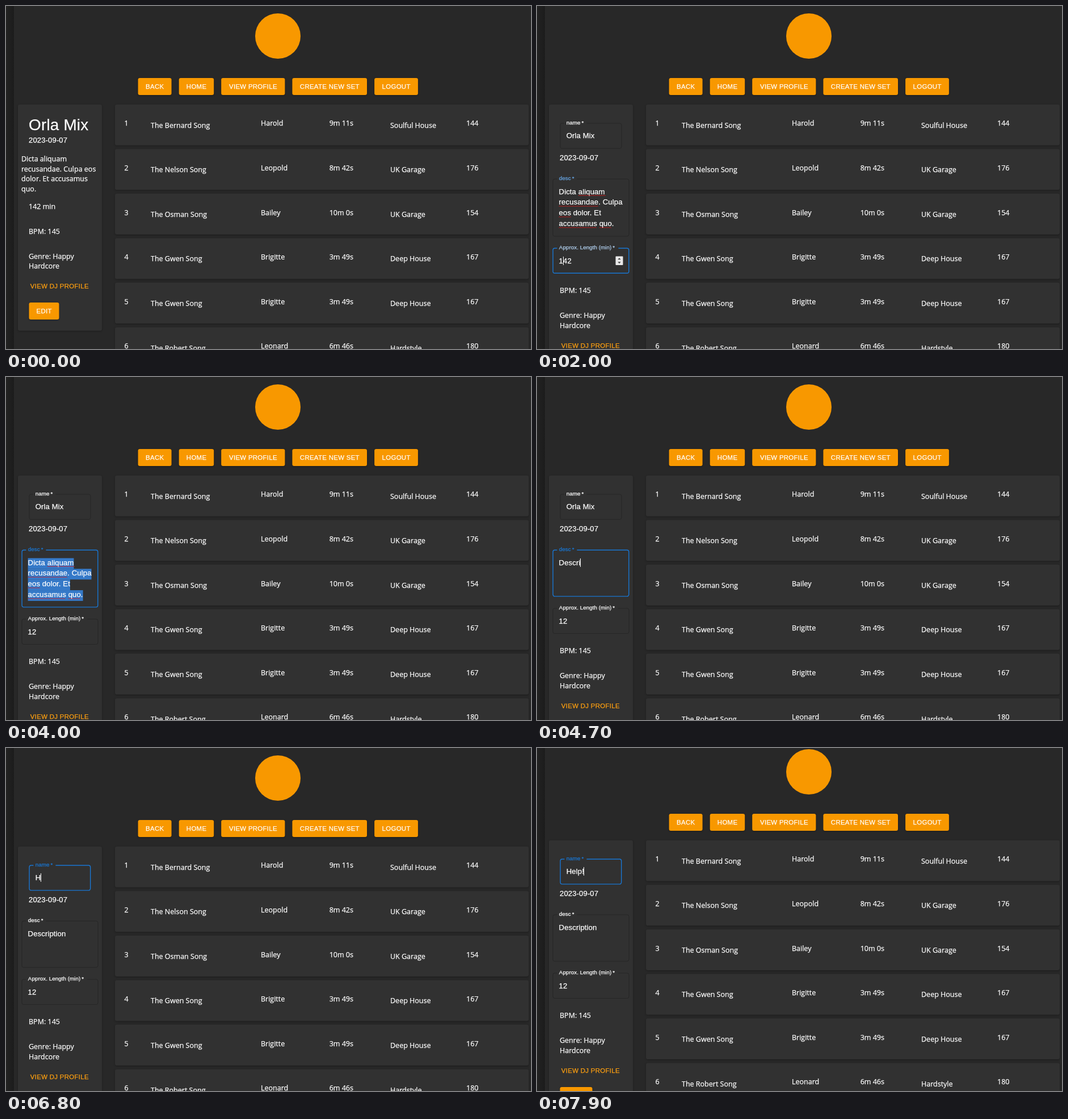
An HTML page that plays this animation: 925 by 605 pixels, repeating every 8000 ms.

```html
<!DOCTYPE html>
<html lang="en">
<head>
<meta charset="utf-8">
<title>Edit a set</title>
<style>
html, body { margin: 0; width: 100%; height: 100%; overflow: hidden; background: #282828; }
svg { display: block; }
text { color: #fff; fill: currentColor; stroke: currentColor; stroke-width: .25px; white-space: pre; }
.body { font: 12.5px "Open Sans", "Noto Sans", sans-serif; }
.input { font: 13.1px "Liberation Sans", Arial, sans-serif; letter-spacing: .12px; }
.label { font: 9.8px "Liberation Sans", Arial, sans-serif; letter-spacing: .05px; }
.button { font: 11.4px "Liberation Sans", Arial, sans-serif; letter-spacing: .33px; }
.title { font: 27.9px "Liberation Sans", Arial, sans-serif; letter-spacing: .2px; }
.card { fill: #313131; filter: drop-shadow(0 1px 1.5px rgba(0,0,0,.3)); }
.press { filter: drop-shadow(0 1px 1.5px rgba(0,0,0,.3)); }
</style>
</head>
<body>
<svg width="925" height="605">
  <defs>
    <linearGradient id="edge"><stop stop-color="#222"/><stop offset="1" stop-color="#1c1c1c"/></linearGradient>
  </defs>
  <rect width="925" height="605" fill="#282828"/>
  <rect width="14" height="605" fill="url(#edge)"/>
  <g id="page"><g id="fixed"></g><g id="side"></g></g>
</svg>
<script>
const LOOP = 8000, ORANGE = "#f89800", BLUE = "#1976d2";
const SET = "Orla Mix";
const DESC = ["Dicta aliquam", "recusandae. Culpa", "eos dolor. Et", "accusamus quo."];
const $ = id => document.getElementById(id);
const pen = document.createElement("canvas").getContext("2d");
pen.font = '13.1px "Liberation Sans", Arial, sans-serif';
const width = s => pen.measureText(s).width + s.length * .12;

// Baselines sit on whole pixels
const text = (cls, x, y, s, extra = "") => `<text class="${cls}" x="${x}" y="${Math.floor(y)}" ${extra}>${s}</text>`;
const rect = (x, y, w, h, fill, extra = "") =>
  `<rect x="${x}" y="${y}" width="${w}" height="${h}" fill="${fill}" ${extra}/>`;
const button = (x, y, w, s, fill = ORANGE) =>
  rect(x, y, w, 30, fill, 'rx="3.3" class="press"') +
  text("button", x + w / 2 + .16, y + 19, s, 'text-anchor="middle"');
const card = (x, y, w, h) => `<rect class="card" x="${x}" y="${y}" width="${w}" height="${h}" rx="3.3"/>`;
const caret = (x, y, s) => rect(Math.floor(x + width(s)), y, 1, 15, "#fff");

function squiggle(x, y, before, word) {
  const a = x + width(before), n = Math.round(width(word) / 3);
  return `<path d="M${a} ${y}${"l1.5 -1.5l1.5 1.5".repeat(n)}" fill="none" stroke="#e01818" stroke-width=".9"/>`;
}

// Outlined box whose top border leaves a gap for the label
function field(x, y, w, h, label, gap, blue, focus, hover) {
  const r = 3.3, k = focus ? 1.4 : 1, i = k / 2;
  const l = x + i, t = y + i, R = x + w - i, b = y + h - i;
  const stroke = focus ? BLUE : hover ? "#080808" : "#262626";
  const d = `M${x + 8 + gap} ${t}H${R - r}a${r} ${r} 0 0 1 ${r} ${r}V${b - r}a${r} ${r} 0 0 1 ${-r} ${r}` +
    `H${l + r}a${r} ${r} 0 0 1 ${-r} ${-r}V${t + r}a${r} ${r} 0 0 1 ${r} ${-r}H${x + 8}`;
  const c = [25, 118, 210].map(v => Math.round(255 + (v - 255) * blue));
  return `<path d="${d}" fill="none" stroke="${stroke}" stroke-width="${k}"/>` +
    text("label", x + 11.4, y + 3.1, label + "\u2009*", `style="color:rgb(${c})"`);
}

function fixedParts() {
  const nav = [[232.6, 59, "BACK"], [304.7, 61.5, "HOME"], [379.2, 112.2, "VIEW PROFILE"],
    [504.4, 131.6, "CREATE NEW SET"], [649.1, 76.8, "LOGOUT"]];
  const rows = [
    ["Bernard", "Harold", "9m 11s", "Soulful House", 144],
    ["Nelson", "Leopold", "8m 42s", "UK Garage", 176],
    ["Osman", "Bailey", "10m 0s", "UK Garage", 154],
    ["Gwen", "Brigitte", "3m 49s", "Deep House", 167],
    ["Gwen", "Brigitte", "3m 49s", "Deep House", 167],
    ["Robert", "Leonard", "6m 46s", "Hardstyle", 180]];
  return `<circle cx="479" cy="53" r="40" fill="${ORANGE}"/>` +
    nav.map(([x, w, s]) => button(x, 127, w, s)).join("") +
    rows.map(([song, artist, time, genre, bpm], i) => {
      const y = i * 78.6;
      return card(192, 173.7 + y, 729, 72) +
        text("body", 208.5, 211.8 + y, i + 1) +
        text("body", 255, 215 + y, `The ${song} Song`) +
        text("body", 449, 211.8 + y, artist) +
        text("body", 569.7, 211.8 + y, time) +
        text("body", 677, 215 + y, genre) +
        text("body", 811, 211.8 + y, bpm);
    }).join("");
}

// BPM, genre and link; y is the BPM baseline
const details = y =>
  text("body", 40, y, "BPM: 145") +
  text("body", 40, y + 44, "Genre: Happy") + text("body", 40, y + 61.7, "Hardcore") +
  text("button", 42.8, y + 96.8, "VIEW DJ PROFILE", 'style="color:#ffa010"');

function viewMode(T) {
  const lines = ["Dicta aliquam", "recusandae. Culpa eos", "dolor. Et accusamus", "quo."];
  return card(21, 173.7, 148, 399) + text("title", 40, 219.5, SET) + text("input", 40, 241.5, "2023-09-07") +
    lines.map((s, i) => text("body", 27, 274.4 + i * 17.7, s)).join("") +
    text("body", 40, 358.4, "142 min") + details(402) +
    button(40.5, 523, 53, "EDIT", T >= 600 ? "#f57c00" : ORANGE);
}

function editMode(T) {
  const during = (a, b) => T >= a && T < b;
  const clamp = v => Math.max(0, Math.min(1, v));
  const blue = (a, b) => clamp((T - a) / 150) - clamp((T - b) / 150);
  // Latest entry of [time, value, time, value, ...]
  const latest = list => list.reduce((v, e, i) => i % 2 && T >= list[i - 1] ? e : v, "");
  const cleared = T >= 4200, shift = cleared ? -19 : 0;
  const onName = T >= 6000, onLength = during(1950, 3800);
  const onDesc = during(1050, 1950) || during(3800, 6000);
  const overLength = during(800, 1000) || during(1500, 1950);
  let s = card(21, 173.7, 148, 520);

  s += field(40.4, 206.3, 109, 45.5, "name", 39, blue(6000, 9000), onName, during(5900, 6000));
  const name = T < 6800 ? SET : latest([6800, "H", 7000, "He", 7100, "Hel", 7200, "Help", 7500, "Help!"]);
  if (during(6400, 6800)) s += rect(51.8, 221, width(SET), 16, "#3579c8");
  s += text("input", 51.8, 233, name);
  if (during(6000, 6400)) s += caret(51.8, 221, SET.slice(0, -1));
  if (T >= 6800) s += caret(51.8, 221, name);
  s += text("input", 40, 272.7, "2023-09-07");

  s += field(27.4, 304.6, 135.1, cleared ? 83 : 102, "desc", 35,
    blue(1050, 1950) + blue(3800, 6000), onDesc, during(1000, 1050) || during(3500, 3800));
  if (cleared) {
    const typed = "Description".slice(0, latest([4200, 1, 4400, 3, 4600, 4, 4700, 6, 4800, 7, 4900, 8, 5000, 10, 5100, 11]));
    s += text("input", 38.6, 332, typed);
    if (T < 5600) s += caret(38.6, 320, typed);
  } else {
    DESC.forEach((line, i) => {
      if (T >= 4000) s += rect(38.6, 319.5 + i * 18.85, width(line), 18.85, "#3579c8");
      s += text("input", 38.6, 332 + i * 18.85, line);
    });
    if (T >= 1050) {
      s += squiggle(38.6, 335, "Dicta ", "aliquam") + squiggle(38.6, 353.9, "", "recusandae") +
        squiggle(38.6, 372.7, "", "eos") + squiggle(38.6, 391.6, "", "accusamus") +
        squiggle(38.6, 391.6, "accusamus ", "quo");
    }
    if (during(1050, 1500) || during(3800, 4000)) s += caret(38.6, 376.5, DESC[3]);
  }

  s += `<g transform="translate(0 ${shift})">` +
    field(27.4, 426.5, 135.1, 45.5, "Approx. Length (min)", 108, blue(1950, 3800), onLength, overLength) +
    text("input", 38.6, 454, T < 3000 ? "142" : "12");
  if (onLength || overLength) {
    s += rect(138.5, 441.5, 13, 15.5, "#e9e9e9", 'rx="1"') +
      '<path d="M142.3 447.2l2.7 -3l2.7 3zM142.3 451.3l2.7 3l2.7 -3z" fill="#444"/>';
  }
  if (during(2000, 2500) || during(3000, 3500)) s += caret(38.6, 442, "1");
  return s + details(506.3) + button(40.5, 628, 57, "SAVE") + "</g>";
}

$("fixed").innerHTML = fixedParts();
let shown = -1;
function frame(now) {
  const T = Math.floor(now % LOOP / 100) * 100;
  if (T !== shown) {
    shown = T;
    $("side").innerHTML = T < 700 ? viewMode(T) : editMode(T);
    $("page").setAttribute("transform", `translate(0 ${T >= 7900 ? -11 : 0})`);
  }
  requestAnimationFrame(frame);
}
frame(0);
</script>
</body>
</html>
```
